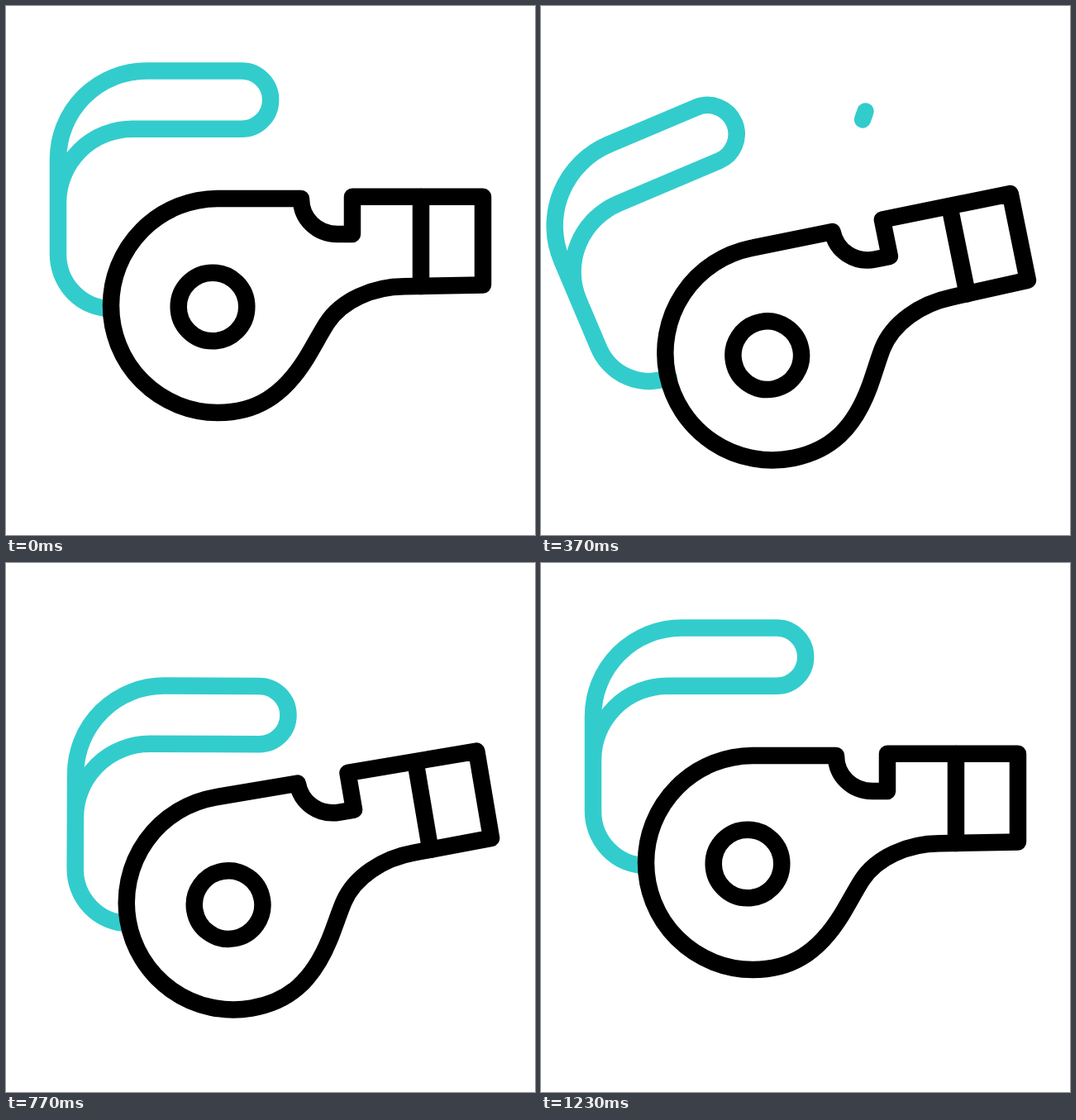
Animation, 640 px wide and 640 px high, one loop 1670 ms. Source, as an HTML page:

```html
<!DOCTYPE html>
<html lang="en">
<head>
<meta charset="utf-8">
<title>Whistle</title>
<style>
  html, body { margin: 0; width: 100%; height: 100%; overflow: hidden; background: #fff; }
  svg { display: block; width: 100vw; height: 100vh; }
  .ink { stroke: #000; }
  .aqua { stroke: #33cccc; }
</style>
</head>
<body>
<svg viewBox="0 0 640 640" fill="none" stroke-width="20.5" stroke-linecap="round" stroke-linejoin="round">
  <g id="whistle">
    <g id="strap" class="aqua">
      <path d="M127 366 A64 66 0 0 1 63 299 V185.5 A107 107 0 0 1 170 78.5 H285 A35 35 0 0 1 285 148.8 H153 A90 89 0 0 0 63 238"/>
    </g>
    <g class="ink">
      <path d="M357 233 H256.5 A129.5 129.5 0 0 0 256.5 492 C302 492 335 472 363.5 426 C372 412 381 395 388 384 C406 356 444 339.5 482 339.3 L577 337.5 V230.7 H419 V276 H401 C376 276 357 257 357 233 Z"/>
      <path d="M502 231 V339"/>
      <circle cx="250" cy="364" r="41.3"/>
    </g>
  </g>
  <line id="inkRay" class="ink"/>
  <line id="aquaRay" class="aqua"/>
</svg>
<script>
const LOOP = 1670, FPS = 30;
const $ = id => document.getElementById(id);

// Key poses: [tick, value], eased between neighbours.
const swing = [[0, 0], [7.35, -25.4], [16.1, 11.6], [23, -9.6], [28.7, 8.6], [35, 0]];
const sway = [[3.5, 0], [11, -11.5], [19, 19.2], [26, 3.7], [32.5, 19.4], [37, 0]];

// Each ray grows from its start, then its tail catches up with its tip.
const rays = [
  { el: $('inkRay'), from: [388, 242], to: [493, 184], tip: [[0, 0], [4, 1]], tail: [[4, 0], [8, 1]] },
  { el: $('aquaRay'), from: [354.5, 236.5], to: [392.5, 127.5], tip: [[3, 0], [7.5, 1]], tail: [[7.5, 0], [11.8, 1]] }
];

const ease = p => p * p * (3 - 2 * p);

function valueAt(keys, tick) {
  if (tick <= keys[0][0]) return keys[0][1];
  for (let i = 1; i < keys.length; i++) {
    const [t0, v0] = keys[i - 1], [t1, v1] = keys[i];
    if (tick < t1) return v0 + (v1 - v0) * ease((tick - t0) / (t1 - t0));
  }
  return keys[keys.length - 1][1];
}

function drawRay({ el, from, to, tip, tail }, tick) {
  const a = valueAt(tail, tick), b = valueAt(tip, tick);
  const at = (axis, p) => from[axis] + (to[axis] - from[axis]) * p;
  el.setAttribute('x1', at(0, a));
  el.setAttribute('y1', at(1, a));
  el.setAttribute('x2', at(0, b));
  el.setAttribute('y2', at(1, b));
  el.setAttribute('visibility', b > a ? 'visible' : 'hidden');
}

function draw(ms) {
  const tick = Math.floor((ms % LOOP + 4) * FPS / 1000);
  $('whistle').setAttribute('transform', `rotate(${valueAt(swing, tick)} 554.5 275)`);
  $('strap').setAttribute('transform', `rotate(${valueAt(sway, tick)} 128 362)`);
  rays.forEach(ray => drawRay(ray, tick));
}

const start = performance.now();
function loop() {
  draw(performance.now() - start);
  requestAnimationFrame(loop);
}
loop();
</script>
</body>
</html>
```
